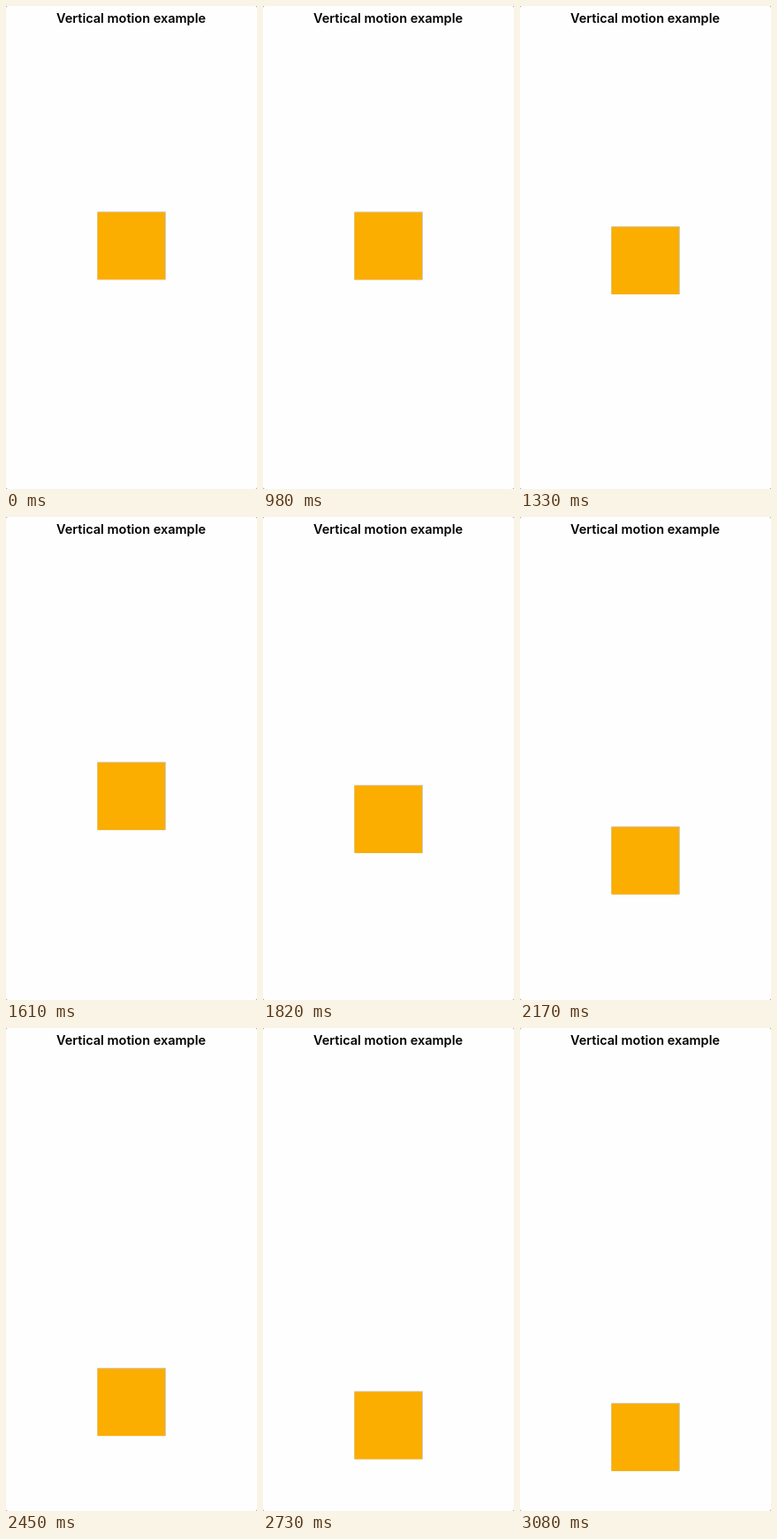
An HTML page without scripts that plays this animation: 284x546 px, repeating every 3.43 s.

```html
<!DOCTYPE html>
<html lang="en">
<head>
<meta charset="utf-8">
<title>Vertical motion example</title>
<style>
  @property --frame {
    syntax: "<number>";
    inherits: false;
    initial-value: 0;
  }

  html, body {
    margin: 0;
    width: 100%;
    height: 100%;
    overflow: hidden;
    background: #8a8a8a;
  }

  svg {
    display: block;
    width: 284px;
    height: 546px;
    border-radius: 2px;
    background: #fefefe;
  }

  text {
    font: 600 14.5px Inter, sans-serif;
    text-anchor: middle;
  }

  /* Smoothstep ease, sampled every 70 ms */
  .box {
    --p: clamp(0, (var(--frame) * 70 - 944) / 2130, 1);
    transform: translateY(calc(191.5px * var(--p) * var(--p) * (3 - 2 * var(--p))));
    animation: tick 3430ms steps(49) infinite;
  }

  @keyframes tick {
    from { --frame: 0; }
    to { --frame: 49; }
  }
</style>
</head>
<body>
<svg viewBox="0 0 284 546">
  <text x="141.5" y="19.3">Vertical motion example</text>
  <g class="box">
    <rect x="103.3" y="232.3" width="77.7" height="77" fill="#d0cac4"/>
    <rect x="103.5" y="233.2" width="76.4" height="76.1" fill="#fbad00"/>
  </g>
</svg>
</body>
</html>
```
